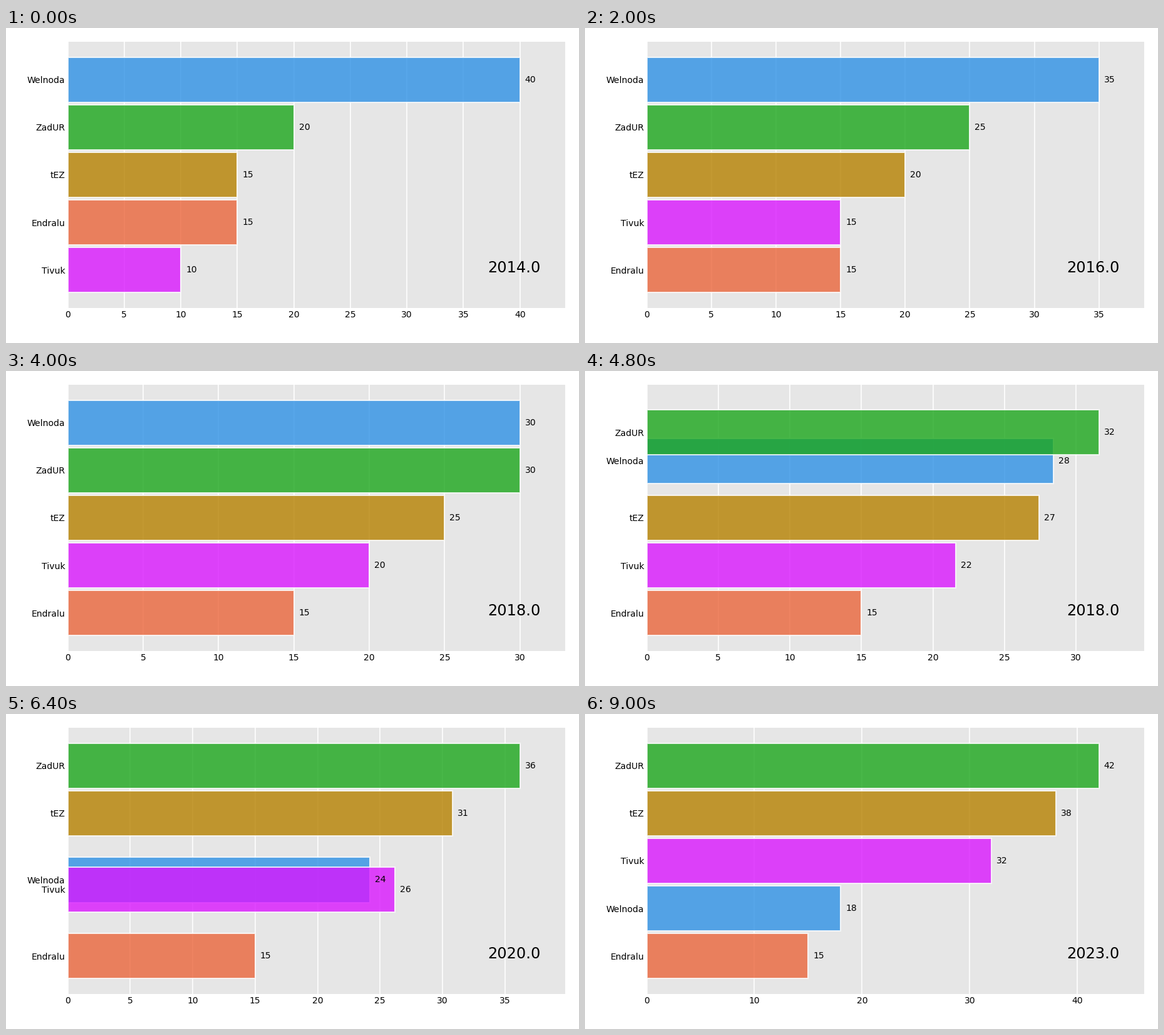
These frames come from a looping animation (915x504 px, 9.1 s). A matplotlib script:

```python
import numpy as np
import matplotlib.pyplot as plt
from matplotlib.animation import FuncAnimation

W, H, DPI = 915, 504, 144
LEFT, RIGHT, TOP, BOTTOM = 98.5, 893, 22, 448
STEPS = 10
START = 2014

# name: (colour, yearly values)
SERIES = {
    "Welnoda": ("#2E91E5", [40, 38, 35, 32, 30, 28, 25, 23, 20, 18]),
    "ZadUR": ("#1CA71C", [20, 22, 25, 28, 30, 32, 35, 38, 40, 42]),
    "Tivuk": ("#DA16FF", [10, 12, 15, 18, 20, 22, 25, 28, 30, 32]),
    "tEZ": ("#B68100", [15, 18, 20, 22, 25, 28, 30, 32, 35, 38]),
    "Endralu": ("#EB663B", [15] * 10),
}
names = list(SERIES)
colors = [color for color, _ in SERIES.values()]
yearly = np.array([vals for _, vals in SERIES.values()], float).T
n_years, n_bars = yearly.shape
n_frames = (n_years - 1) * STEPS + 1

# Ties keep column order; the largest value gets the highest slot.
order = np.argsort(-yearly, axis=1, kind="stable")
slots = n_bars - np.argsort(order, axis=1)


def tween(table, i):
    k, step = divmod(i, STEPS)
    nxt = min(k + 1, n_years - 1)
    return table[k] + (table[nxt] - table[k]) * step / STEPS


plt.rcParams["font.family"] = "DejaVu Sans"
fig = plt.figure(figsize=(W / DPI, H / DPI), dpi=DPI, facecolor="white")
ax = fig.add_axes([LEFT / W, 1 - BOTTOM / H,
                   (RIGHT - LEFT) / W, (BOTTOM - TOP) / H])
ax.set_facecolor(".9")
ax.set_axisbelow(True)
ax.grid(True, axis="x", color="white")
ax.tick_params(length=0, labelsize=7, pad=2)
ax.spines[:].set_visible(False)

bars = ax.barh(slots[0], yearly[0], height=0.95, color=colors,
               edgecolor="white", alpha=0.8)
labels = [ax.text(0, 0, "", size=7, ha="left", va="center") for _ in names]
year = ax.text(0.95, 0.15, "", size=12, ha="right", va="center",
               transform=ax.transAxes)
ax.set_ylim(0.2, n_bars + 0.8)


def update(i):
    values, pos = tween(yearly, i), tween(slots, i)
    limit = values.max() * 1.1
    ax.set_xlim(0, limit)
    ax.set_yticks(pos, names)
    for bar, label, v, y in zip(bars, labels, values, pos):
        bar.set_width(v)
        bar.set_y(y - bar.get_height() / 2)
        label.set_position((v + 0.01 * limit, y))
        label.set_text(f"{v:.0f}")
    year.set_text(f"{START + i // STEPS}.0")
    return [*bars, *labels, year]


anim = FuncAnimation(fig, update, frames=n_frames, interval=100,
                     init_func=lambda: update(0), repeat=True,
                     repeat_delay=0, blit=False)
plt.show()
```
